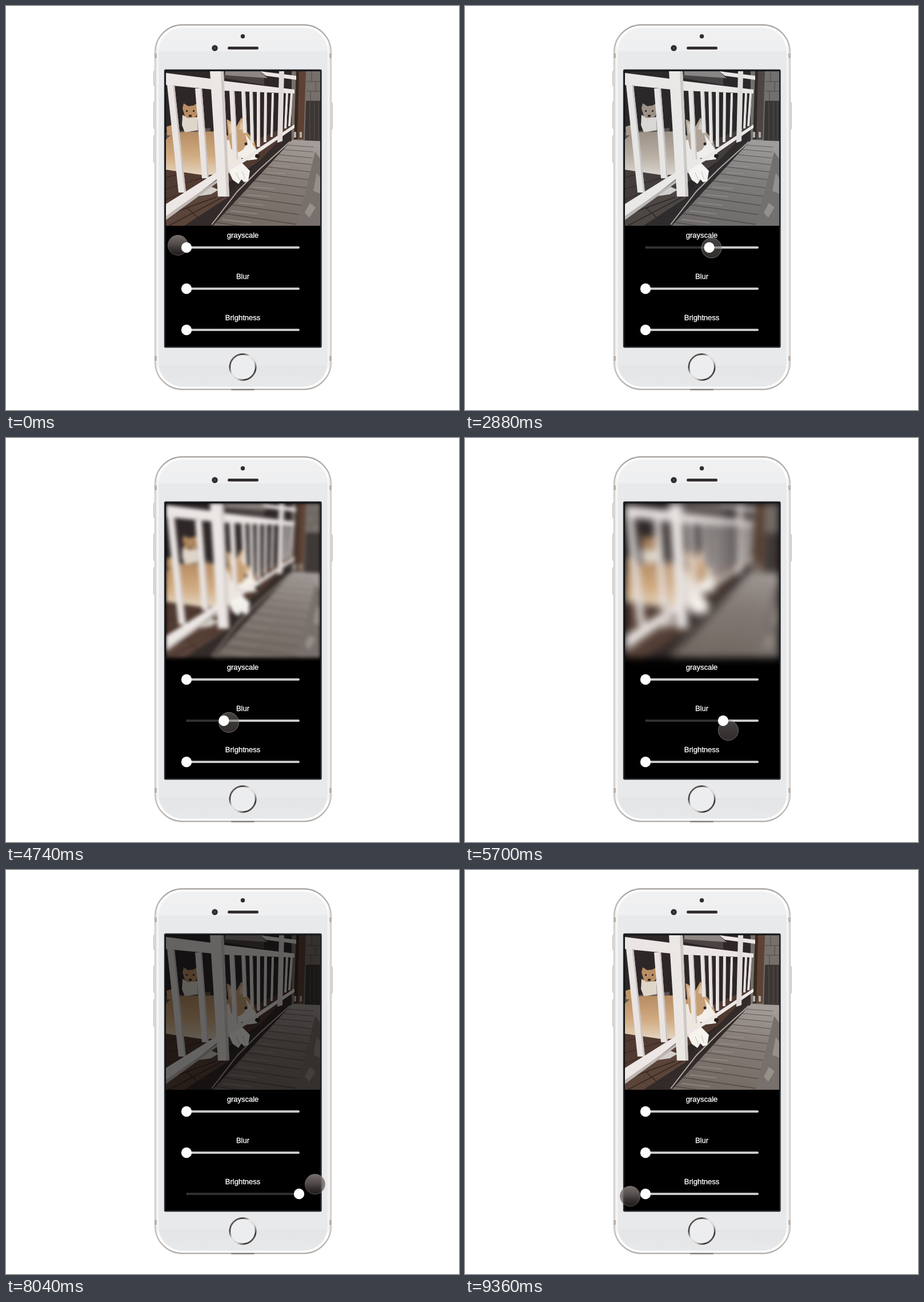
An HTML page that plays this animation: 793 px wide and 706 px high, repeating every 9420 ms.

```html
<!DOCTYPE html>
<html lang="en">
<head>
<meta charset="utf-8">
<title>Image filter sliders</title>
<style>
  html, body { margin: 0; width: 100%; height: 100%; overflow: hidden; background: #fff; }
  svg { position: absolute; display: block; }
  .layer { left: 0; top: 0; width: 793px; height: 706px; }
  .screen { position: absolute; left: 280px; top: 114px; width: 270px; height: 480px; overflow: hidden; background: #000; }
  #photo { left: 0; top: 0; width: 270px; height: 270px; overflow: hidden; }
  text { font: 13px "Liberation Sans", Arial, sans-serif; fill: #fff; stroke: #fff; stroke-width: .3; text-anchor: middle; }
</style>
</head>
<body>
<svg class="layer" viewBox="0 0 793 706">
  <defs>
    <linearGradient id="edge" x2="0" y2="1">
      <stop stop-color="#aaa5a1"/><stop offset=".1" stop-color="#d2ceca"/>
      <stop offset=".9" stop-color="#d2ceca"/><stop offset="1" stop-color="#b5afaa"/>
    </linearGradient>
    <linearGradient id="rim">
      <stop stop-color="#dcdcdc"/><stop offset=".02" stop-color="#fff"/>
      <stop offset=".98" stop-color="#fff"/><stop offset="1" stop-color="#dcdcdc"/>
    </linearGradient>
    <linearGradient id="face" x2="0" y2="1">
      <stop stop-color="#f1f1f2"/><stop offset=".065" stop-color="#eeeff0"/>
      <stop offset=".068" stop-color="#e8e9eb"/><stop offset=".94" stop-color="#e8e9eb"/>
      <stop offset=".943" stop-color="#e4e5e7"/><stop offset="1" stop-color="#e7e8ea"/>
    </linearGradient>
    <linearGradient id="ring" x2="1" y2="1">
      <stop stop-color="#8d8885"/><stop offset=".25" stop-color="#403c3a"/>
      <stop offset=".42" stop-color="#e9e6e4"/><stop offset=".62" stop-color="#d3cfcc"/>
      <stop offset=".8" stop-color="#35302e"/><stop offset="1" stop-color="#aaa5a1"/>
    </linearGradient>
  </defs>
  <g fill="#eeecea" stroke="#bcb7b2">
    <rect x="258.5" y="113.5" width="3" height="26" rx="1"/>
    <rect x="258.5" y="167.5" width="3" height="47" rx="1"/>
    <rect x="258.5" y="226.5" width="3" height="47" rx="1"/>
    <rect x="568.5" y="168.5" width="3" height="47" rx="1"/>
  </g>
  <rect x="261" y="33" width="308" height="637" rx="48" fill="url(#rim)" stroke="url(#edge)" stroke-width="2.4"/>
  <rect x="266.5" y="37.5" width="297" height="628" rx="43" fill="url(#face)" stroke="#f8f8f8"/>
  <g fill="#bdb1a8">
    <rect x="260" y="83" width="4" height="8"/><rect x="566" y="83" width="4" height="8"/>
    <rect x="260" y="612" width="4" height="8"/><rect x="566" y="612" width="4" height="8"/>
  </g>
  <rect x="394" y="669" width="41" height="2.5" rx="1" fill="#8b8582"/>
  <circle cx="414.5" cy="53" r="3.7" fill="#2e2c2c"/>
  <circle cx="365.5" cy="73.5" r="5.2" fill="#2d2b2c"/>
  <circle cx="365.5" cy="73.5" r="2" fill="#48464c"/>
  <rect x="388" y="71" width="54" height="5" rx="2.5" fill="#332f2e"/>
  <circle cx="414.5" cy="631" r="22.7" fill="#ecedee" stroke="url(#ring)" stroke-width="2.7"/>
  <rect x="278" y="112" width="273.5" height="484" rx="1.5" fill="#000" stroke="#25292d" stroke-width="2.4"/>
</svg>

<div class="screen">
  <svg id="photo" viewBox="280 114 270 270">
    <defs>
      <linearGradient id="boards" x1=".7" x2=".4" y2="1">
        <stop stop-color="#a39c98"/><stop offset=".4" stop-color="#857c77"/><stop offset="1" stop-color="#736963"/>
      </linearGradient>
      <linearGradient id="coat" x2="0" y2="1">
        <stop stop-color="#b58c63"/><stop offset=".55" stop-color="#d0aa80"/><stop offset="1" stop-color="#e4d5c2"/>
      </linearGradient>
    </defs>
    <path fill="#2d2727" d="M280 114h270v270H280z"/>
    <path fill="#4b4341" d="M382 114h70v24l-70-12z"/>
    <path fill="#8d8581" d="M384 114h60l14 12-74-5z"/>
    <path fill="#766f6a" d="M500 114h50v122h-50z"/>
    <path stroke="#514a47" d="M526 132h24M526 149h24M526 166h24M535 114v18M542 132v17M533 149v17"/>
    <path fill="#3b3533" d="M525 166h25v70h-27z"/>
    <path stroke="#5a524e" d="M532 168v66M540 168v67M547 168v67"/>
    <path fill="#5d4234" d="M508 114h17l-4 119h-17z"/>
    <path fill="#39291f" d="M508 114h5l-3 119h-6z"/>
    <path fill="#b6aea8" d="M504 220h4v10h-4zM514 220h4v10h-4z"/>
    <path fill="#503a31" d="M280 283l100-24 120-52v25L372 320l-92 48z"/>
    <path stroke="#35251f" d="M280 300l90-25M280 320l80-25M280 338l70-25"/>
    <path fill="#5c5350" d="M280 221l78-8v10l-78 8z"/>
    <path fill="url(#boards)" d="M497 234l53 2v148H358z"/>
    <g id="planks"></g>
    <path fill="#77706c" d="M541 255l9 12v117h-42l17-62z"/>
    <path fill="#979089" d="M544 292l6 8v28l-12-5zM532 344l10 8-11 18-8-9z"/>
    <path fill="#332b29" d="M500 212v23L362 384h-62l90-57z"/>
    <path fill="#5b443a" d="M280 352l94-34 18 14-80 52h-32z"/>
    <path fill="none" stroke="#352620" stroke-width="1.5" d="M280 366l88-32M285 384l95-50M316 352l22 20"/>
    <path fill="none" stroke="#b0a8a1" stroke-width="2" d="M497 237l-54 49-38 38-45 58"/>
    <path fill="#d3cec9" d="M338 324l22-8 12 5-13 8-21 3z"/>

    <path fill="#b98e64" d="M309 179l2-9 8 5 9-1 7-4-1 21-8 8h-11z"/>
    <path fill="#dfd6ca" d="M309 190l9 6 17-2 1 23-23 4-5-13z"/>
    <path fill="#3a2d28" d="M315 182h3v3h-3zM327 182h3v3h-3zM320 190h5v4h-5z"/>
    <path fill="#c09569" d="M281 211l12-4 9 8-2 12-18-1z"/>
    <path fill="url(#coat)" d="M280 233q14-15 45-13l46-1 28 12 17 33-18 27-50 5-68-10z"/>
    <path fill="#eee7de" d="M383 235l18-2 15 32-11 23-25-5z"/>
    <path fill="#c79f75" d="M386 198q9 2 16 15l10-18q9 9 10 25l12 15 5 17-16 10-29-12-5-24z"/>
    <path fill="#e0c1a3" d="M389 202l10 12-7 11zM412 200l6 18-10-3z"/>
    <path fill="#f3eee8" d="M419 224l11 15 12 18-3 11-16 2-21-11 13-8 8-12z"/>
    <path fill="#f6f3ee" d="M393 283l19-10 15 15-3 18-7 2-5-5-5 8-10-7-6-13z"/>
    <path fill="none" stroke="#c9bdb3" d="M403 291l6 14M414 289l4 13"/>
    <ellipse cx="440" cy="262" rx="4" ry="3.5" fill="#221d1c"/>
    <circle cx="420" cy="241" r="2.5" fill="#2b211d"/>
    <path fill="none" stroke="#4c3b33" stroke-width="1.5" d="M437 269l-13 2-12-5"/>

    <path fill="#ebe6e4" d="M445 114l63 8v7l-53-7zM280 117l78 10 24 4 123 15v7l-123-5-102-10z"/>
    <path fill="#282324" d="M456 152l27 3v7l-25 1z"/>
    <g id="balusters" fill="#e9e4e2"></g>
    <path fill="#ece7e5" d="M280 346l91-57 40-20 94-62v6l-80 55-42 24-103 79z"/>
    <path fill="#bdb5b1" d="M280 367l102-72v5l-102 74z"/>
    <path fill="#ebe7e5" d="M357 114h24l10 219h-20z"/>
    <path fill="#cfc8c5" d="M376 114h5l10 219h-5z"/>
    <path fill="#e2dddb" d="M478 114h9l-3 122-9 3z"/>
  </svg>
</div>

<svg class="layer" viewBox="0 0 793 706">
  <defs>
    <linearGradient id="touchIdle" x2="0" y2="1">
      <stop stop-color="#8b827f" stop-opacity=".85"/><stop offset=".45" stop-color="#665e5c" stop-opacity=".8"/>
      <stop offset="1" stop-color="#3b3535" stop-opacity=".5"/>
    </linearGradient>
    <linearGradient id="touchDown" x2="0" y2="1">
      <stop stop-color="#766e6d" stop-opacity=".6"/><stop offset="1" stop-color="#6a6262" stop-opacity=".45"/>
    </linearGradient>
  </defs>
  <g id="tracks"></g>
  <circle id="touch" r="17.5" stroke-opacity=".6"/>
  <g id="knobs"></g>
</svg>

<script>
const LOOP = 9420, STEP = 60;
const TRACK = { x: 316, width: 197 };
const byId = id => document.getElementById(id);

// Rows are [time, value, ...], joined by straight segments.
const touchPath = [
  [0, 301, 418], [500, 301, 420], [1000, 330, 424], [1860, 445, 424],
  [2400, 540, 424], [2600, 540, 422], [3240, 292, 424], [3420, 286, 430],
  [3720, 304, 454], [3840, 311, 474], [4140, 317, 496], [4740, 390, 497],
  [5300, 533, 510], [5500, 533, 508], [6180, 288, 518], [6480, 290, 572],
  [6780, 314, 564], [6960, 297, 563], [7740, 535, 556], [8040, 541, 549],
  [8340, 541, 552], [9000, 302, 566], [9360, 289, 570]
];
const presses = [[600, 2900], [4000, 6050], [6660, 7860], [8340, 9120]];
const sliders = [
  { label: "grayscale", y: 422, path: [[600, 0], [1860, .503], [2400, 1], [2650, 1], [3180, 0]] },
  { label: "Blur", y: 494, path: [[4150, 0], [4740, .332], [5300, 1], [5520, 1], [6100, 0]] },
  { label: "Brightness", y: 566, path: [[7000, 0], [7740, 1], [8340, 1], [8980, 0]] }
];

function sample(path, time) {
  const next = path.findIndex(row => row[0] > time);
  if (next <= 0) return path.at(next).slice(1);
  const from = path[next - 1], to = path[next];
  const k = (time - from[0]) / (to[0] - from[0]);
  return from.slice(1).map((v, i) => v + (to[i + 1] - v) * k);
}

function addShape(parent, tag, attributes) {
  const node = document.createElementNS("http://www.w3.org/2000/svg", tag);
  for (const name in attributes) node.setAttribute(name, attributes[name]);
  return parent.appendChild(node);
}

function buildPhoto() {
  // top x, top y, width, bottom x, bottom y
  const balusters = [
    [282, 138, 13, 302, 326], [331, 144, 12, 343, 301], [391, 148, 9, 397, 268],
    [412, 149, 7, 415, 222], [426, 150, 6, 428, 240], [439, 150, 6, 439, 246],
    [452, 151, 5, 451, 238], [465, 152, 4, 463, 229], [490, 152, 4, 487, 214], [498, 152, 4, 494, 210]
  ];
  for (const [x, y, w, bx, by] of balusters) {
    addShape(byId("balusters"), "path", { d: `M${x} ${y}h${w}L${bx + w} ${by}h${-w}z` });
    addShape(byId("balusters"), "path", { d: `M${x + w * .8} ${y}h${w * .2}L${bx + w} ${by}h${-w * .2}z`, fill: "#c8c0bd" });
  }
  for (let i = 1; i < 13; i++) {
    const t = (i / 12) ** 1.35;
    const x = 495 - 128 * t, y = 238 + 140 * t;
    addShape(byId("planks"), "path", {
      d: `M${x} ${y}L${540 - 22 * t} ${y + 3 + 20 * t}`, stroke: "#514844", "stroke-width": .7 + t * .7
    });
    addShape(byId("planks"), "path", {
      d: `M${x + 12} ${y - 5 * t}l${20 + 30 * t} ${6 * t}`, stroke: "#a69d97", "stroke-width": 1 + t, opacity: .55
    });
  }
}

function buildSliders() {
  for (const s of sliders) {
    const bar = { x: TRACK.x, y: s.y - 2, height: 4, rx: 2 };
    addShape(byId("tracks"), "text", { x: 414.5, y: s.y - 17 }).textContent = s.label;
    addShape(byId("tracks"), "rect", { ...bar, width: TRACK.width + 1, fill: "#c7c8c8" });
    s.used = addShape(byId("tracks"), "rect", { ...bar, fill: "#303030" });
    s.knob = addShape(byId("knobs"), "circle", { cy: s.y, r: 9.2, fill: "#fff" });
  }
}

function render(elapsed) {
  const time = Math.floor((elapsed % LOOP) / STEP) * STEP;
  const [gray, blur, dim] = sliders.map(s => {
    const [value] = sample(s.path, time);
    s.used.setAttribute("width", value * TRACK.width);
    s.knob.setAttribute("cx", TRACK.x + value * TRACK.width);
    return value;
  });
  byId("photo").style.filter =
    `grayscale(${Math.min(1, gray * 1.3)}) blur(${blur * 10}px) brightness(${1 - dim * .57})`;

  const [x, y] = sample(touchPath, time);
  const pressed = presses.some(([from, to]) => time >= from && time < to);
  const touch = byId("touch");
  touch.setAttribute("cx", x);
  touch.setAttribute("cy", y);
  touch.setAttribute("fill", pressed ? "url(#touchDown)" : "url(#touchIdle)");
  touch.setAttribute("stroke", pressed ? "#a69f9d" : "#8d8583");
}

buildPhoto();
buildSliders();
const start = performance.now();
function tick() {
  render(performance.now() - start);
  requestAnimationFrame(tick);
}
tick();
</script>
</body>
</html>
```
